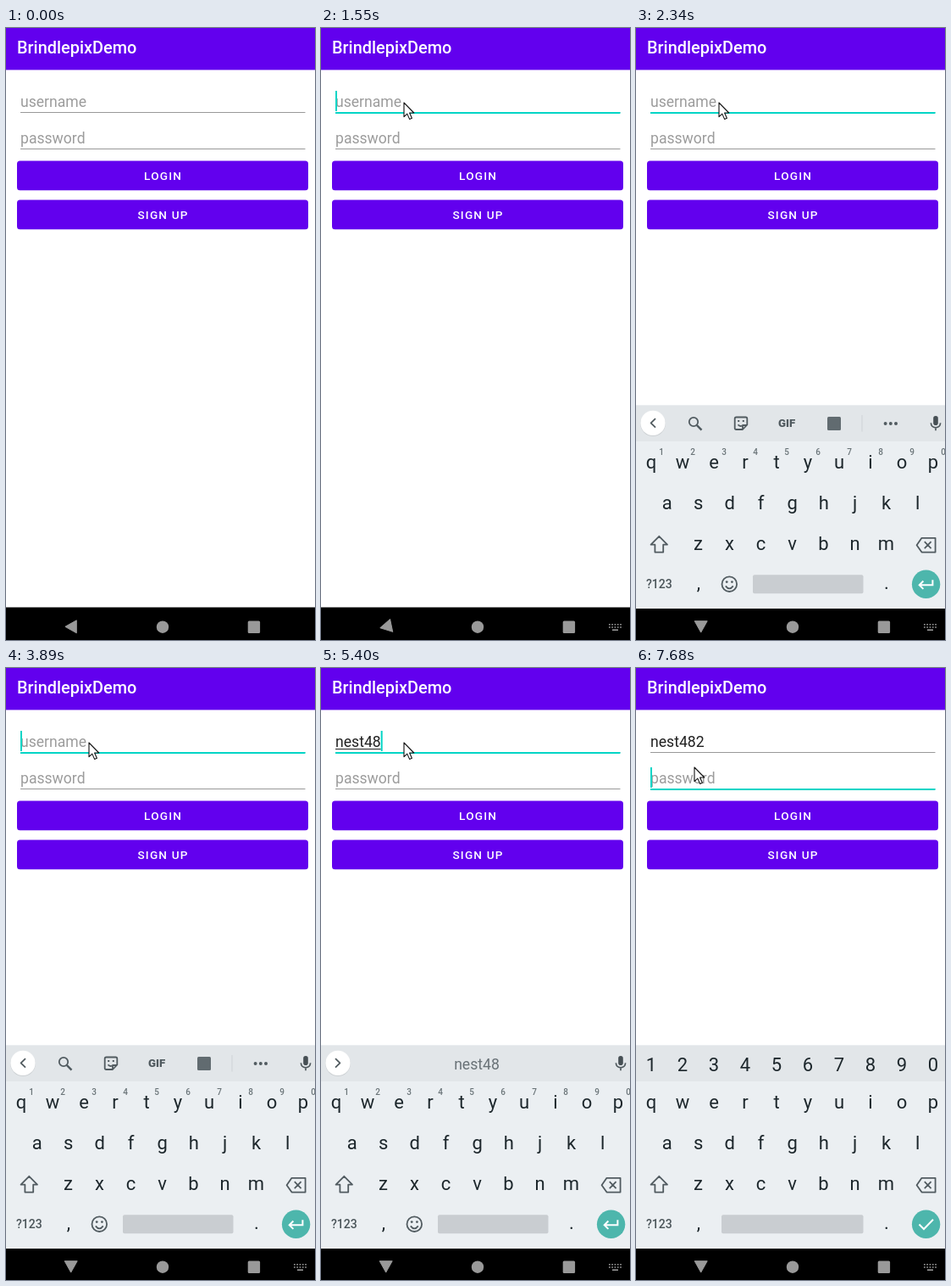
Recreate the animation shown at these times as an HTML page. Size 365x721 px, loop 8 s.

```html
<!DOCTYPE html>
<html lang="en">
<head>
<meta charset="utf-8">
<title>Login form</title>
<style>
html, body { margin: 0; width: 100%; height: 100%; overflow: hidden; background: #fff; }
svg { display: block; width: 365px; height: 721px; font-family: Roboto, Arial, sans-serif; }
.mid { text-anchor: middle; }
.field { font-size: 17.6px; }
.btn { font-size: 13.6px; font-weight: 500; letter-spacing: 1.2px; fill: #fff; text-anchor: middle; }
.key { font-size: 22px; fill: #1d272c; text-anchor: middle; }
.sup { font-size: 10px; font-weight: 500; fill: #6a7478; text-anchor: middle; }
.line { fill: none; stroke: #515b60; stroke-width: 1.8; stroke-linejoin: round; }
.word { font-size: 17.6px; fill: #697277; text-anchor: middle; }
</style>
</head>
<body>
<svg viewBox="0 0 365 721" xmlns="http://www.w3.org/2000/svg">
  <defs><clipPath id="kbClip"><rect y="440" width="365" height="244"/></clipPath></defs>
  <rect width="365" height="721" fill="#fff"/>
  <rect width="365" height="49.4" fill="#6200ee"/>
  <text x="13" y="30.3" font-size="19.9" font-weight="500" fill="#fff">BrindlepixDemo</text>

  <g class="field">
    <text id="userHint" x="17" y="93" fill="#9c9c9c">username</text>
    <text id="userText" x="17" y="93" fill="#212121"></text>
    <text id="passHint" x="17" y="136" fill="#9c9c9c">password</text>
  </g>
  <rect id="compose" x="17" y="95" width="0" height="1" fill="#212121"/>
  <rect x="17" y="99" width="336.5" height="1" fill="#999"/>
  <rect id="userLine" x="17" y="99" width="336.5" height="2" fill="#03d5c6"/>
  <rect x="17" y="142" width="336.5" height="1" fill="#999"/>
  <rect id="passLine" x="17" y="142" width="336.5" height="2" fill="#03d5c6"/>
  <rect id="caret" width="2" height="24" fill="#03d5c6"/>

  <rect x="13" y="156.5" width="344" height="34.7" rx="3.5" fill="#6200ee"/>
  <rect x="13" y="202.5" width="344" height="34.7" rx="3.5" fill="#6200ee"/>
  <text class="btn" x="185.6" y="179.2">LOGIN</text>
  <text class="btn" x="185.6" y="225.2">SIGN UP</text>

  <rect y="682.5" width="365" height="38.5" fill="#000"/>
  <g fill="#999">
    <path id="back" d="M-7.5 -6.6H7.5L0 6.8Z" stroke="#999" stroke-linejoin="round"/>
    <circle cx="185" cy="705.7" r="7.2"/>
    <rect x="285.7" y="698.6" width="14.4" height="14.4" rx="1.5"/>
    <g id="kbIcon" fill="none" stroke="#999" stroke-width="1.6">
      <path d="M340 702.8H355M340 706H355" stroke-dasharray="1.7 1.6"/>
      <path d="M344 709.2H351"/>
    </g>
  </g>

  <g clip-path="url(#kbClip)">
    <g id="kb">
      <rect y="444.5" width="365" height="250" fill="#ebeff2"/>
      <rect y="444.5" width="365" height="42.5" fill="#e2e6e9"/>
      <g id="strip">
        <circle cx="20" cy="466.2" r="14.8" fill="#cdd1d4"/>
        <circle cx="20" cy="465.4" r="14.6" fill="#fff"/>
        <path id="chevron" d="M3 -5.2L-2.4 0L3 5.2" class="line"/>
        <g id="tools">
          <circle class="line" cx="68" cy="464" r="5.2"/>
          <path class="line" d="M71.8 467.8L77.5 473.6" style="stroke-width:2.4"/>
          <path class="line" d="M118.5 458.5H129.5Q131.3 458.5 131.3 460.3V467.5L126 473H118.5Q116.7 473 116.7 471.2V460.3Q116.7 458.5 118.5 458.5ZM126 473V468H131.3M120.5 467.2Q122.5 469.8 125 468.6"/>
          <path d="M120.2 462h2v2h-2ZM125.8 462h2v2h-2Z" fill="#515b60"/>
          <text class="mid" x="178" y="470.3" font-size="13.2" font-weight="900" fill="#515b60">GIF</text>
          <rect x="226" y="458" width="16" height="16" rx="1.5" fill="#616b70"/>
          <path d="M267 456V475.5" stroke="#cfd3d6"/>
          <g fill="#515b60"><circle cx="294.6" cy="466" r="2"/><circle cx="300.8" cy="466" r="2"/><circle cx="307" cy="466" r="2"/></g>
        </g>
        <g id="words">
          <text class="word" x="84" y="472.5"></text>
          <text class="word" x="184" y="472.5"></text>
          <text class="word" x="281" y="472.5"></text>
        </g>
        <rect x="351.2" y="457" width="5.6" height="11" rx="2.8" fill="#464f54"/>
        <path class="line" d="M348.4 465.3Q348.6 470.6 354 470.8Q359.4 470.6 359.6 465.3M354 470.8V474.3" style="stroke-width:1.7"/>
      </g>
      <g id="digits"></g>
      <g id="sups"></g>
      <g id="keys"></g>
      <path class="line" d="M27.3 598.8L37 608.7H32.2V617.6H22.4V608.7H17.6Z"/>
      <path class="line" d="M337.5 600.8H353.6V617.6H337.5L331.6 609.2ZM340.8 605.2L348.6 613.1M348.6 605.2L340.8 613.1"/>
      <text class="mid" x="27.3" y="660.4" font-size="14" fill="#4b555a" font-weight="500">?123</text>
      <text class="key" x="74" y="660.5">,</text>
      <text class="key" x="296" y="660.5">.</text>
      <g id="smile">
        <circle class="line" cx="110.3" cy="655.2" r="8.8"/>
        <path class="line" d="M105.8 657.4Q110.3 663.4 114.8 657.4"/>
        <circle cx="107.2" cy="652.6" r="1.4" fill="#515b60"/><circle cx="113.4" cy="652.6" r="1.4" fill="#515b60"/>
      </g>
      <rect id="space" y="644.3" height="22" rx="2" fill="#c9cdd1"/>
      <circle cx="342.6" cy="655.3" r="16.7" fill="#4db6ac"/>
      <path id="enter" fill="none" stroke="#fff" stroke-width="2"/>
    </g>
  </g>

  <path id="mouse" d="M0 0V16.6L3.8 13.1L6.6 19.4L9.4 18.2L6.6 12H11.8Z" fill="#fff" stroke="#111" stroke-width="1.1" stroke-linejoin="round"/>
</svg>
<script>
const LOOP = 8000;
const $ = id => document.getElementById(id);
const show = (id, v) => $(id).setAttribute('opacity', +v);
const set = (id, attrs) => { for (const k in attrs) $(id).setAttribute(k, attrs[k]); };

// Evenly spaced key labels
function row(id, chars, x, y, cls = 'key') {
  [...chars].forEach((c, i) => {
    const el = document.createElementNS('http://www.w3.org/2000/svg', 'text');
    el.setAttribute('class', cls);
    el.setAttribute('x', x + 37 * i);
    el.setAttribute('y', y);
    el.textContent = c;
    $(id).append(el);
  });
}
row('digits', '1234567890', 18, 474.5);
row('sups', '1234567890', 30, 503, 'sup');
row('keys', 'qwertyuiop', 18, 519);
row('keys', 'asdfghjkl', 36.7, 567);
row('keys', 'zxcvbnm', 73.5, 615);

// Tables hold [time, ...values]
const held = (table, t) => table.filter(r => r[0] <= t).pop();
function path(table, t) {
  const i = table.findIndex(r => r[0] > t);
  if (i < 0) return table[table.length - 1].slice(1);
  if (!i) return table[0].slice(1);
  const a = table[i - 1], b = table[i], p = (t - a[0]) / (b[0] - a[0]);
  return a.slice(1).map((v, k) => v + (b[k + 1] - v) * p);
}

const TYPED = [[0, 0], [4430, 1], [4510, 2], [4600, 3], [4680, 4], [5160, 5], [5310, 6], [5630, 7]];
const NAME = 'nest482';
const BLINKS = [1000, 1630, 1860, 2340, 2900, 3360, 3890, 6130, 6440, 7130, 7680];
const SLIDE = [[0, 0, 40], [1630, .6, 14], [1710, .97, 2], [1780, 1, 1], [1860, 1, 0]];
const TURN = [[0, 90], [1550, 78], [1630, 25], [1710, 0]];
const MOUSE = [[70, 348, 711], [230, 302, 560], [390, 226, 350], [550, 146, 172], [700, 99, 82], [860, 98, 88],
  [6050, 93, 93], [6130, 83, 103], [6210, 73, 113], [6290, 69, 117]];
const FOCUS = [[0, 0], [920, .4], [1000, .8], [1080, 1], [6760, 0]];
const ICON = [[0, 0], [1150, .5], [1230, 1]];

function draw(t) {
  // Pointer
  const pos = t < 860 ? path(MOUSE, 70 + Math.floor((t - 70) / 79) * 79) : held(MOUSE, t).slice(1);
  set('mouse', { transform: `translate(${pos})` });
  show('mouse', t >= 70);

  // Fields
  const name = NAME.slice(0, held(TYPED, t)[1]);
  $('userText').textContent = name;
  const width = name ? $('userText').getComputedTextLength() : 0;
  const onPass = t >= 6440;
  show('userHint', !name);
  show('userLine', held(FOCUS, t)[1]);
  show('passLine', onPass);
  set('passHint', { fill: onPass && t < 6760 ? '#757575' : '#9c9c9c' });
  set('compose', { width: t < 5630 ? width : 0 });
  set('caret', { x: onPass ? 17 : 17 + width, y: onPass ? 117 : 74 });
  show('caret', BLINKS.filter(b => b <= t).length % 2);

  // Navigation bar
  set('back', { transform: `translate(76.7 705.3) rotate(${held(TURN, t)[1]})` });
  show('kbIcon', held(ICON, t)[1]);

  // Keyboard
  const [, alpha, dy] = held(SLIDE, t);
  const words = t >= 4510 && t < 5630;
  const numeric = t >= 7130;
  set('kb', { opacity: alpha, transform: `translate(0 ${dy})` });
  show('tools', t < 4510 || t >= 5800);
  show('strip', !numeric);
  show('digits', numeric);
  show('sups', !numeric);
  show('smile', !numeric);
  set('chevron', { transform: `translate(20 465.4) scale(${t >= 4510 && t < 5800 ? -1 : 1} 1)` });
  const list = !words ? [] : t >= 4760 && t < 5160 ? ['nests', name, 'nested'] : ['', name, ''];
  [...$('words').children].forEach((el, i) => el.textContent = list[i] || '');
  const left = numeric ? 101 : 138;
  set('space', { x: left, width: 268.5 - left });
  set('enter', { d: numeric ? 'M334.5 655.5L340 661L351 649.8' : 'M350.4 650.3V656.2H335M339.4 651.5L334.7 656.2L339.4 660.9' });
}

const start = performance.now();
function tick() {
  draw((performance.now() - start) % LOOP);
  requestAnimationFrame(tick);
}
tick();
</script>
</body>
</html>
```
